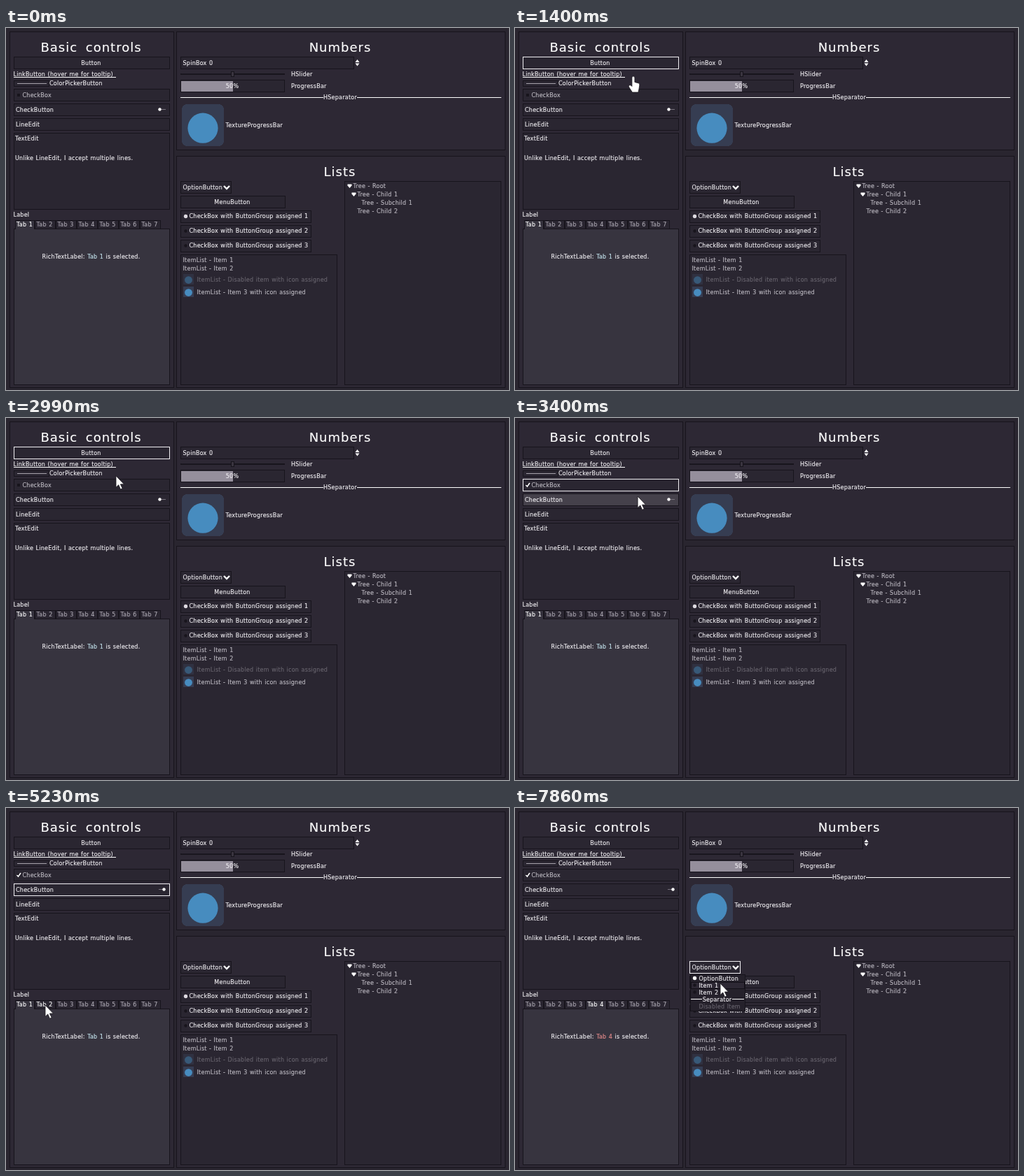
An HTML page for the animation above (8000 ms loop, 718x518 px).

```html
<!DOCTYPE html>
<html lang="en">
<head>
<meta charset="utf-8">
<title>Theme controls</title>
<style>
  html, body { margin: 0; width: 100%; height: 100%; overflow: hidden; background: #29252f; }
  svg { display: block; width: 718px; height: 518px; }
  rect, .crisp { shape-rendering: crispEdges; }
  text {
    font: 8px 'DejaVu Sans', sans-serif; letter-spacing: .25px; word-spacing: .6px;
    fill: #f0eef2; stroke: #f0eef2; stroke-width: .15px; white-space: pre;
  }
  .title { font-size: 18px; letter-spacing: 1px; word-spacing: 5px; fill: #fff; }
  .soft { fill: #bbb8c0; stroke: #bbb8c0; }
  .off { fill: #67636d; stroke: #67636d; }
  .tip { fill: #211d27; stroke: #211d27; }
</style>
</head>
<body>
<svg id="stage" viewBox="0 0 718 518"></svg>
<script>
const LOOP = 8000;
const C = {
  panel: '#2d2834', field: '#2a2631', edge: '#17141c', hover: '#45414b',
  focus: '#f0eef2', tab: '#37343f', white: '#fff', blue: '#478cbf', tile: '#363d52'
};
const stage = document.getElementById('stage');

function el(tag, attrs, parent = stage, content) {
  const node = document.createElementNS('http://www.w3.org/2000/svg', tag);
  set(node, attrs);
  if (content !== undefined) node.textContent = content;
  return parent.appendChild(node);
}
function set(node, attrs) {
  for (const key in attrs) node.setAttribute(key, attrs[key]);
}
function show(node, visible) {
  node.style.display = visible ? '' : 'none';
}
const group = () => el('g', {});

function box(x1, y1, x2, y2, fill = C.field, parent = stage, stroke = C.edge) {
  const node = el('rect', {
    x: x1 + .5, y: y1 + .5, width: x2 - x1 - 1, height: y2 - y1 - 1, rx: 1, fill, stroke
  }, parent);
  node.bounds = [x1, y1, x2, y2];
  return node;
}
function label(content, x, middle, cls = '', parent = stage, anchor = 'start') {
  return el('text', { x, y: middle + 2.8, class: cls, 'text-anchor': anchor }, parent, content);
}
function centered(content, x, middle, cls, parent) {
  return label(content, x, middle, cls, parent, 'middle');
}
function title(content, x, baseline) {
  el('text', { x, y: baseline, class: 'title', 'text-anchor': 'middle' }, stage, content);
}
function bar(x1, y, x2, fill = C.white, height = 1, parent = stage) {
  return el('rect', { x: x1, y, width: x2 - x1, height, fill }, parent);
}
function dot(cx, cy, r, fill = C.white, parent = stage) {
  return el('circle', { cx, cy, r, fill }, parent);
}
function shape(d, fill = C.white, parent = stage) {
  return el('path', { d, fill }, parent);
}
function emblem(x, y, size, opacity) {
  const g = el('g', { opacity });
  el('rect', { x, y, width: size, height: size, rx: size / 8, fill: C.tile }, g);
  dot(x + size / 2, y + size * .57, size * .36, C.blue, g);
}

// Panels
box(5, 5, 240, 515, C.panel);
box(243, 5, 713, 175, C.panel);
box(243, 183, 713, 515, C.panel);

// Basic controls
title('Basic controls', 121.5, 34);
const button = box(11, 41, 234, 59);
centered('Button', 121.5, 50);
label('LinkButton (hover me for tooltip)', 10.5, 66.5);
bar(11, 70, 157);
box(11, 75, 62, 84);
bar(16, 79, 58, '#a5a1aa');
label('ColorPickerButton', 62, 79.5);

const checkBox = box(11, 87, 234, 105);
el('rect', { x: 16, y: 94, width: 4, height: 4, fill: C.edge });
const tick = el('path', { d: 'M15.5 96l2 2 3.5-5', fill: 'none', stroke: C.white, 'stroke-width': 1.6 });
label('CheckBox', 23.5, 96, 'soft');

const checkButton = box(11, 108, 234, 126);
label('CheckButton', 14, 117);
const dash = bar(222, 116, 228, '#77727d');
const knob = dot(219.5, 116.5, 2.2);

box(11, 129, 234, 147);
label('LineEdit', 14, 138);
box(11, 150, 234, 260);
label('TextEdit', 13, 158.5);
label('Unlike LineEdit, I accept multiple lines.', 13, 186.5);
label('Label', 10.5, 267.5);

// Tabs
const TAB_COLORS = ['#c4e4ee', '#a6dfa4', '#eadb92', '#e58b8b'];
const tabs = [];
for (let i = 0; i < 7; i++) {
  const x = i ? 11 + 30 * i : 13;
  const rect = box(x, 275, 41 + 30 * i, 289);
  tabs.push({ rect, text: label('Tab ' + (i + 1), i ? 13.5 + 30 * i : 15, 281.5) });
}
box(11, 287, 234, 511, C.tab);
const gap = bar(13, 286, 40, C.tab, 2);
const rich = centered('', 121.5, 327.5);
el('tspan', {}, rich, 'RichTextLabel: ');
const richTab = el('tspan', {}, rich);
el('tspan', {}, rich, ' is selected.');

// Numbers
title('Numbers', 477, 34);
box(249, 41, 497, 59);
label('SpinBox 0', 252.5, 50);
shape('M498.5 49l3-4 3 4ZM498.5 50.500l3 4 3-4Z');
bar(249, 65, 398, C.edge, 2);
bar(250, 65, 321, '#1c1822');
box(321, 62, 326, 70, '#39343f');
label('HSlider', 407, 66.5);
box(249, 74, 398, 92);
bar(250, 75.5, 324, '#958f9c', 15);
centered('50%', 323, 83);
label('ProgressBar', 407, 83);
bar(249, 99, 453);
bar(501, 99, 707);
centered('HSeparator', 477, 99.5);
emblem(251, 109, 60, 1);
label('TextureProgressBar', 313.5, 139);

// Lists
title('Lists', 476.5, 212);
const option = box(249, 219, 322, 237);
label('OptionButton', 252.5, 228);
el('path', { d: 'M311 226l4 4 4-4', fill: 'none', stroke: C.white, 'stroke-width': 2.4 });
const menu = box(249, 240, 399, 258);
centered('MenuButton', 323, 249);
for (let i = 0; i < 3; i++) {
  const middle = 269.5 + 21 * i;
  box(249, middle - 8.5, 436, middle + 9.5);
  dot(256.5, middle, i ? 2.2 : 2.7, i ? C.edge : '#dddae0');
  label('CheckBox with ButtonGroup assigned ' + (i + 1), 261.5, middle);
}
box(249, 324, 473, 511);
label('ItemList - Item 1', 252.5, 332.5, 'soft');
label('ItemList - Item 2', 252.5, 344.5, 'soft');
emblem(253, 352, 15, .5);
label('ItemList - Disabled item with icon assigned', 272.5, 360, 'off');
emblem(253, 370, 15, 1);
label('ItemList - Item 3 with icon assigned', 272.5, 378, 'soft');
box(483, 219, 707, 511);
['Root', 'Child 1', 'Subchild 1', 'Child 2'].forEach((name, i) => {
  const depth = [0, 1, 2, 1][i], y = 226 + 12 * i;
  label('Tree - ' + name, 495.5 + 6 * depth, y, 'soft');
  if (i < 2) shape(`M${487.5 + 6 * i} ${y - 2.5}h6v2l-3 3.500-3-3.500Z`);
});

// Option popup
const popup = group();
box(250, 238, 329, 291, '#25212b', popup);
const popupHover = box(251, 249, 328, 259, C.panel, popup, '#131018');
['OptionButton', 'Item 1', 'Item 2'].forEach((name, i) => {
  const middle = 244 + 10 * i;
  dot(256.5, middle - .5, i ? 2.2 : 2.7, i ? C.edge : C.white, popup);
  label(name, 262.5, middle, '', popup);
});
bar(251, 273, 267, C.white, 1, popup);
bar(310, 273, 327, C.white, 1, popup);
centered('Separator', 288.5, 274, '', popup);
label('Disabled Item', 262.5, 284, 'off', popup);

// Tooltip
const shade = el('linearGradient', { id: 'shade', x2: 0, y2: 1 }, el('defs', {}));
el('stop', { offset: 0, 'stop-color': '#f5f4f6' }, shade);
el('stop', { offset: 1, 'stop-color': '#cecbd2' }, shade);
const tooltip = group();
box(146, 75, 501, 108, 'url(#shade)', tooltip);
label('This is a tooltip.', 148, 79.5, 'tip', tooltip);
label('Its background is styled using the TooltipPanel class within a Theme resource.', 148, 95.5, 'tip', tooltip);
label('Its text is styled using the TooltipLabel class within a Theme resource.', 148, 103.5, 'tip', tooltip);

// Pointer
const pointer = group();
set(pointer, { stroke: '#1a171d', 'stroke-width': .8, 'stroke-linejoin': 'round' });
const arrow = shape('M0 0V16.500l3.700-3.500 2.800 6.300 2.700-1.200-2.800-6h5.100Z', C.white, pointer);
const hand = shape('M-2 1.500a2 2 0 0 1 4 0V8l5.500 1.500q1.800.700 1.400 3L8 18l-1 4.500H-1.500L-6 15.500q-1.300-2 0-3 1.500-.8 3 .5l1 1Z', C.white, pointer);

// Pointer path: time, x, y
const PATH = [
  [300, 236, 15], [720, 227, 45], [1260, 227, 45], [1400, 169, 69.5], [1820, 139, 66],
  [2780, 139, 66], [3120, 168, 93], [3260, 169, 94], [3400, 175, 112], [3600, 196, 117],
  [4210, 196, 117], [4280, 190, 130], [4480, 188, 132], [4850, 98, 250], [5100, 55, 286],
  [5230, 56, 282], [5400, 56, 282], [5600, 86, 282], [5720, 86, 282], [5930, 116, 280],
  [6340, 115, 280], [6550, 289, 245], [6830, 290, 230], [7240, 291, 231], [7860, 293, 251]
];
function pointerAt(t) {
  const next = PATH.findIndex(p => p[0] > t);
  if (next < 0) return PATH[PATH.length - 1].slice(1);
  if (next === 0) return [-99, -99];
  const [t0, x0, y0] = PATH[next - 1], [t1, x1, y1] = PATH[next];
  const k = (t - t0) / (t1 - t0);
  return [x0 + (x1 - x0) * k, y0 + (y1 - y0) * k];
}

// Time from which a control has the focus
const FOCUS = [[930, button], [3260, checkBox], [3740, checkButton], [5300, null], [6900, option]];
const TAB_CLICKS = [5300, 5650, 5990];

function render(t) {
  const [x, y] = pointerAt(t);
  const open = t >= 6900;
  const over = ({ bounds: [x1, y1, x2, y2] }) => x >= x1 && x < x2 && y >= y1 && y < y2;

  let focused = null;
  for (const [start, control] of FOCUS) if (t >= start) focused = control;
  for (const control of [button, checkBox, checkButton, option, menu]) {
    set(control, {
      fill: over(control) && !open ? C.hover : C.field,
      stroke: control === focused ? C.focus : C.edge
    });
  }
  if (t >= 930 && t < 1000) set(button, { fill: '#1f1b25' });

  show(tick, t >= 3260);
  const on = t >= 3740;
  set(knob, { cx: on ? 225.5 : 219.5 });
  set(dash, { x: on ? 218 : 222 });

  const current = TAB_CLICKS.filter(click => t >= click).length;
  tabs.forEach(({ rect, text }, i) => {
    const lit = i === current || over(rect);
    set(rect, { fill: i === current ? C.tab : C.field });
    text.style.fill = text.style.stroke = lit ? C.white : '#aaa6b0';
  });
  set(gap, { x: current ? 12 + 30 * current : 14, width: current ? 28 : 26 });
  richTab.textContent = 'Tab ' + (current + 1);
  set(richTab, { fill: TAB_COLORS[current], stroke: TAB_COLORS[current] });

  show(tooltip, t >= 2360 && t < 2780);
  show(popup, open);
  show(popupHover, open && y >= 239);
  set(popupHover, { y: y >= 249 ? 249.5 : 239.5 });

  const onLink = x >= 11 && x < 234 && y >= 61 && y < 72;
  show(pointer, t >= PATH[0][0]);
  show(hand, onLink);
  show(arrow, !onLink);
  set(pointer, { transform: `translate(${x} ${y})` });
}

const start = performance.now();
function tickFrame() {
  render((performance.now() - start) % LOOP);
  requestAnimationFrame(tickFrame);
}
tickFrame();
</script>
</body>
</html>
```
